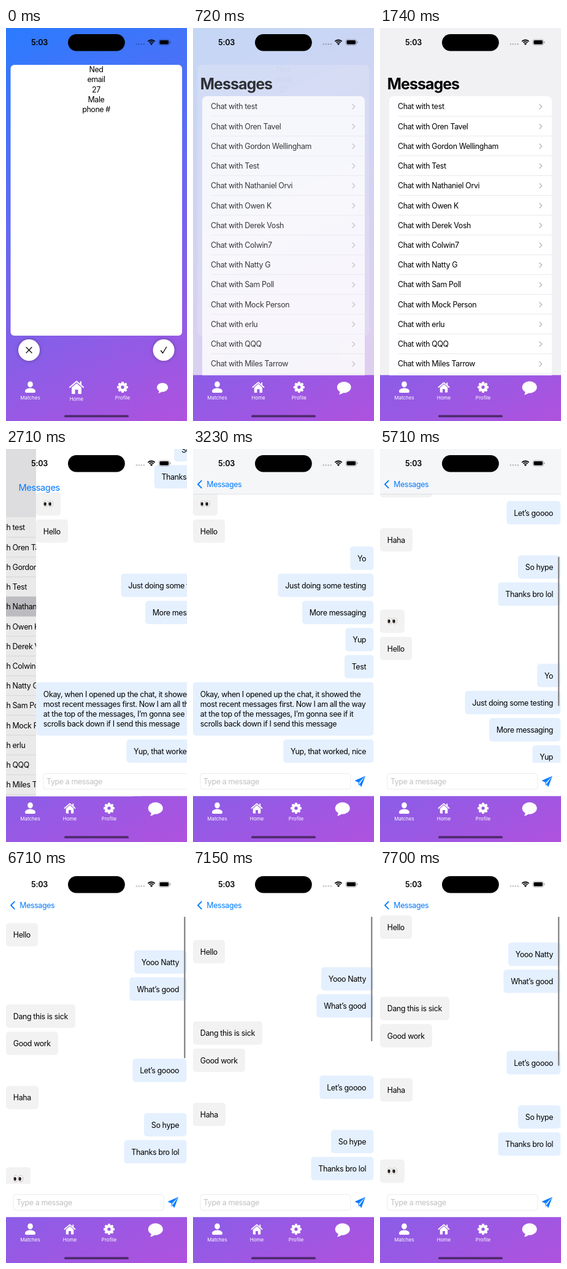
Write an HTML page with a canvas that moves like this. It is 295 by 640 pixels and loops after 8000 ms.

```html
<!DOCTYPE html>
<html>
<head>
<meta charset="utf-8">
<style>
html, body { margin: 0; width: 100%; height: 100%; overflow: hidden; }
canvas { display: block; }
</style>
</head>
<body>
<canvas id="stage" width="295" height="640"></canvas>
<script>
const W = 295, H = 640, LOOP = 8000, TAB_TOP = 565.5, BLUE = '#007aff';
const ctx = document.getElementById('stage').getContext('2d');

const people = ['test', 'Oren Tavel', 'Gordon Wellingham', 'Test', 'Nathaniel Orvi', 'Owen K', 'Derek Vosh',
  'Colwin7', 'Natty G', 'Sam Poll', 'Mock Person', 'erlu', 'QQQ', 'Miles Tarrow'];
const PICKED = 4, ROW = 32.23;

const EYES = 'eyes';
const messages = [
  ['Hello'], ['Yooo Natty', 1], ['What’s good', 1], ['Dang this is sick'], ['Good work'],
  ['Let’s goooo', 1], ['Haha'], ['So hype', 1], ['Thanks bro lol', 1], [EYES], ['Hello'],
  ['Yo', 1], ['Just doing some testing', 1], ['More messaging', 1], ['Yup', 1], ['Test', 1],
  ['Okay, when I opened up the chat, it showed the\nmost recent messages first. Now I am all the way\nat the top of the messages, I’m gonna see if it\nscrolls back down if I send this message', 1],
  ['Yup, that worked, nice', 1]
];
const BOTTOM = 401;

const clamp = v => Math.max(0, Math.min(1, v));
const mix = (a, b, k) => a + (b - a) * k;
const smooth = k => k * k * (3 - 2 * k);
const spring = (ms, speed) => ms <= 0 ? 0 : 1 - (1 + speed * ms / 1000) * Math.exp(-speed * ms / 1000);

function setFont(size, weight = 400, spacing = 0) {
  ctx.font = `${weight} ${size}px Inter, sans-serif`;
  ctx.letterSpacing = spacing + 'px';
}
function text(str, x, y, color = '#000', align = 'left') {
  ctx.textAlign = align;
  ctx.textBaseline = 'middle';
  ctx.fillStyle = color;
  ctx.fillText(str, x, y + 0.6);
}
const bodyFont = () => setFont(12.4, 400, -0.36);
function box(x, y, w, h, r, color) {
  ctx.fillStyle = color;
  ctx.beginPath();
  ctx.roundRect(x, y, w, h, r);
  ctx.fill();
}
function oval(x, y, rx, ry, color) {
  ctx.fillStyle = color;
  ctx.beginPath();
  ctx.ellipse(x, y, rx, ry, 0, 0, 7);
  ctx.fill();
}
function line(color, width, ...pts) {
  ctx.strokeStyle = color;
  ctx.lineWidth = width;
  ctx.lineCap = ctx.lineJoin = 'round';
  ctx.beginPath();
  for (let i = 0; i < pts.length; i += 2) ctx.lineTo(pts[i], pts[i + 1]);
  ctx.stroke();
}
function shape(d, color) {
  ctx.fillStyle = color;
  ctx.fill(new Path2D(d), 'evenodd');
}
function at(x, y, scale, alpha, draw) {
  ctx.save();
  ctx.translate(x, y);
  ctx.scale(scale, scale);
  ctx.globalAlpha *= alpha;
  draw();
  ctx.restore();
}

function drawBackground() {
  const g = ctx.createLinearGradient(0, 0, W, H);
  g.addColorStop(0, '#2a7bff');
  g.addColorStop(1, '#af52de');
  ctx.fillStyle = g;
  ctx.fillRect(0, 0, W, H);
}

function roundButton(x) {
  ctx.save();
  ctx.shadowColor = 'rgba(0,0,0,.3)';
  ctx.shadowBlur = 6;
  oval(x, 524.5, 17.5, 17.5, '#fff');
  ctx.restore();
}
function drawHome() {
  box(7.5, 60, 279.5, 441, 6, '#fff');
  bodyFont();
  ['Ned', 'email', '27', 'Male', 'phone #'].forEach((s, i) => text(s, 147, 67.8 + i * 16.3, '#000', 'center'));
  roundButton(37.5);
  roundButton(257);
  line('#000', 1.2, 33, 520, 42, 529);
  line('#000', 1.2, 42, 520, 33, 529);
  line('#000', 1.3, 252.5, 525.5, 255.5, 529.5, 261.5, 519.5);
}

function drawList(highlight) {
  ctx.fillStyle = '#f1f1f4';
  ctx.fillRect(0, 0, W, TAB_TOP);
  box(15, 111, 265, 480, 8, '#fff');
  people.forEach((name, i) => {
    const top = 111.5 + i * ROW, y = top + 16.6;
    if (highlight && i === PICKED) box(15, top, 265, ROW, 0, '#cdcdd1');
    bodyFont();
    text('Chat with ' + name, 29, y);
    line('#b9b9bd', 1.4, 260, y - 3.7, 263.8, y, 260, y + 3.7);
    line('#e0e0e3', 0.7, 29.5, top + ROW, 280, top + ROW);
  });
}

function drawEyes(y) {
  for (const x of [15.9, 23.9]) {
    oval(x, y, 3.9, 5.2, '#8b8b8b');
    oval(x, y, 3.4, 4.7, '#fff');
    oval(x - 1.1, y + 0.5, 2.1, 3, '#2c201b');
  }
}
function drawMessages(scroll) {
  messages.forEach(([str, sent], i) => {
    const lines = str.split('\n');
    const long = lines.length > 1;
    const top = (i > 16 ? 874 : 74 + i * 44.17) - scroll;
    const height = long ? 87 : 38;
    if (top > 511 || top + height < 0) return;
    bodyFont();
    const width = long ? W - 0.7 : str === EYES ? 40 : ctx.measureText(str).width + 24;
    const left = sent ? W - 0.7 - width : 0;
    box(left, top, width, height, 5, sent ? '#e4f0fe' : '#f2f2f3');
    if (str === EYES) drawEyes(top + 18.5);
    else lines.forEach((s, n) => text(s, left + 11.8, top + 19.6 + n * 16.2));
  });
}
function drawChat(scroll, showBar) {
  ctx.fillStyle = '#fff';
  ctx.fillRect(0, 0, W, TAB_TOP);
  ctx.save();
  ctx.beginPath();
  ctx.rect(0, 0, W, 511);
  ctx.clip();
  drawMessages(scroll);
  ctx.restore();
  if (showBar) {
    const over = Math.min(0, scroll);
    box(290, 76 + 190 * Math.max(0, scroll) / BOTTOM, 2.4, 243 + over, 1.2, '#88888c');
  }
  ctx.strokeStyle = '#e6e6e8';
  ctx.lineWidth = 0.8;
  ctx.beginPath();
  ctx.roundRect(12, 528.5, 245, 25.5, 4);
  ctx.stroke();
  bodyFont();
  text('Type a message', 17, 541.5, '#c0c0c4');
  shape('M281 532.5 L263.5 540 L269.5 543 Z M281 532.5 L270.3 544 L274.2 550.5 Z M281 532.5 L269.2 542.8 L270.6 549 L271.6 545.4 Z', BLUE);
}

function drawNavBar(alpha) {
  if (alpha <= 0) return;
  ctx.save();
  ctx.globalAlpha = alpha;
  ctx.fillStyle = '#f5f6f8';
  ctx.fillRect(0, 0, W, 73);
  ctx.fillStyle = '#d4d4d8';
  ctx.fillRect(0, 73, W, 0.6);
  ctx.restore();
}
// The large title shrinks into the back button as the chat slides in.
function drawTitle(push) {
  const x = mix(11.7, 22.3, push), y = mix(91.5, 57.6, push);
  const scale = mix(117, 56, push);
  const small = clamp(push * 1.6);
  at(x, y, scale / 117, 1 - small, () => { setFont(25, 700, -1); text('Messages', 0, 0); });
  at(x, y, scale / 56, small, () => { bodyFont(); text('Messages', 0, 0, BLUE); });
  at(0, 0, 1, clamp(push * 8 - 7), () => line(BLUE, 1.8, 13.8, 51.7, 8, 57.5, 13.8, 63.3));
}

function drawHouse() {
  line('#fff', 2.2, -11, 0, 0, -9.5, 11, 0);
  shape('M-8 0.5 L0 -6.5 L8 0.5 V10 Q8 11 7 11 H-7 Q-8 11 -8 10 Z M-2.5 11 V4 H2.5 V11 Z', '#fff');
  shape('M5.5 -9.5 H8 V-2 L5.5 -4.5 Z', '#fff');
}
function drawGear() {
  for (let i = 0; i < 8; i++) {
    ctx.save();
    ctx.rotate(i * Math.PI / 4);
    box(-2, -9, 4, 5, 1.3, '#fff');
    ctx.restore();
  }
  ctx.strokeStyle = '#fff';
  ctx.lineWidth = 4.3;
  ctx.beginPath();
  ctx.arc(0, 0, 4.9, 0, 7);
  ctx.stroke();
}
function drawPerson() {
  oval(0, -4.7, 4.3, 4.9, '#fff');
  shape('M-8.5 7 C-8.5 3 -4 1.6 0 1.6 C4 1.6 8.5 3 8.5 7 Q8.5 9 6.5 9 H-6.5 Q-8.5 9 -8.5 7 Z', '#fff');
}
function drawBubble() {
  oval(0, -1.3, 12, 9.7, '#fff');
  shape('M-7 4 Q-6.5 8.5 -9 11 Q-4 11 -0.5 7 Z', '#fff');
}
function drawTabs(k) {
  const label = (s, x, y) => { setFont(8); text(s, x, y, '#fff', 'center'); };
  const homeX = mix(115, 104, k), profileX = mix(190, 168, k);
  at(39.5, 585, 1, 1, drawPerson);
  at(homeX, 585, mix(1, 0.78, k), 1, drawHouse);
  at(profileX, 585, 1, 1, drawGear);
  at(mix(255, 243.7, k), 586.3, mix(0.76, 1, k), 1, drawBubble);
  label('Matches', 39.5, 601.7);
  label('Home', homeX, mix(603.7, 601.7, k));
  label('Profile', profileX, 601.7);
}

function drawStatus() {
  box(101, 10, 92.8, 27.4, 13.7, '#000');
  setFont(12.6, 600, -0.2);
  text('5:03', 54.5, 23.3, '#000', 'center');
  for (let i = 0; i < 4; i++) oval(212.8 + i * 4, 26.3, 1.2, 1.2, 'rgba(0,0,0,.25)');
  ctx.strokeStyle = '#000';
  ctx.lineCap = 'butt';
  ctx.lineWidth = 1.8;
  for (const r of [8, 5]) {
    ctx.beginPath();
    ctx.arc(237, 27.5, r, -Math.PI * 0.75, -Math.PI * 0.25);
    ctx.stroke();
  }
  shape('M237 28 L234.7 25.3 Q237 23.6 239.3 25.3 Z', '#000');
  ctx.strokeStyle = 'rgba(0,0,0,.4)';
  ctx.lineWidth = 0.8;
  ctx.beginPath();
  ctx.roundRect(249.2, 18.8, 17.2, 9, 2.8);
  ctx.stroke();
  box(250.5, 20.1, 14.6, 6.4, 1.7, '#000');
  box(267.3, 21.8, 1, 3, 0.5, 'rgba(0,0,0,.45)');
  box(95, 630.3, 105, 3.7, 1.85, 'rgba(0,0,0,.5)');
}

// Drag part way, hold, drag past the top, release.
function scrollAt(t) {
  const HELD = 210, PULL = -40;
  if (t < 5540) return mix(BOTTOM, HELD, smooth(clamp((t - 5300) / 240)));
  if (t < 6710) return mix(HELD, -12.5, smooth(clamp((t - 6450) / 260)));
  if (t < 7150) return mix(-12.5, PULL, smooth(clamp((t - 6800) / 130)));
  return t < 7700 ? PULL * (1 - spring(t - 7150, 12)) : 0;
}

function draw(t) {
  const tab = t < 1280 ? spring(t - 500, 13) : 1;
  const push = t < 3010 ? spring(t - 2490, 14.65) : 1;
  ctx.clearRect(0, 0, W, H);
  drawBackground();
  if (tab < 1) at(0, 0, 1, 1 - tab, drawHome);

  ctx.save();
  ctx.beginPath();
  ctx.rect(0, 0, W, TAB_TOP);
  ctx.clip();
  if (tab > 0 && push < 1) {
    at(-0.3 * W * push, 0, 1, tab, () => drawList(t >= 2490));
    if (push > 0) {
      ctx.fillStyle = `rgba(0,0,0,${0.1 * push})`;
      ctx.fillRect(0, 0, W, TAB_TOP);
    }
  }
  if (push > 0) {
    const scroll = scrollAt(t);
    at(W * (1 - push), 0, 1, 1, () => drawChat(scroll, t >= 5230));
    if (push === 1) drawNavBar(clamp(scroll / 12));
  }
  if (tab > 0) at(0, 0, 1, tab, () => drawTitle(push));
  ctx.restore();

  drawTabs(tab);
  drawStatus();
}

function frame() {
  draw(performance.now() % LOOP);
  requestAnimationFrame(frame);
}
frame();
</script>
</body>
</html>
```
